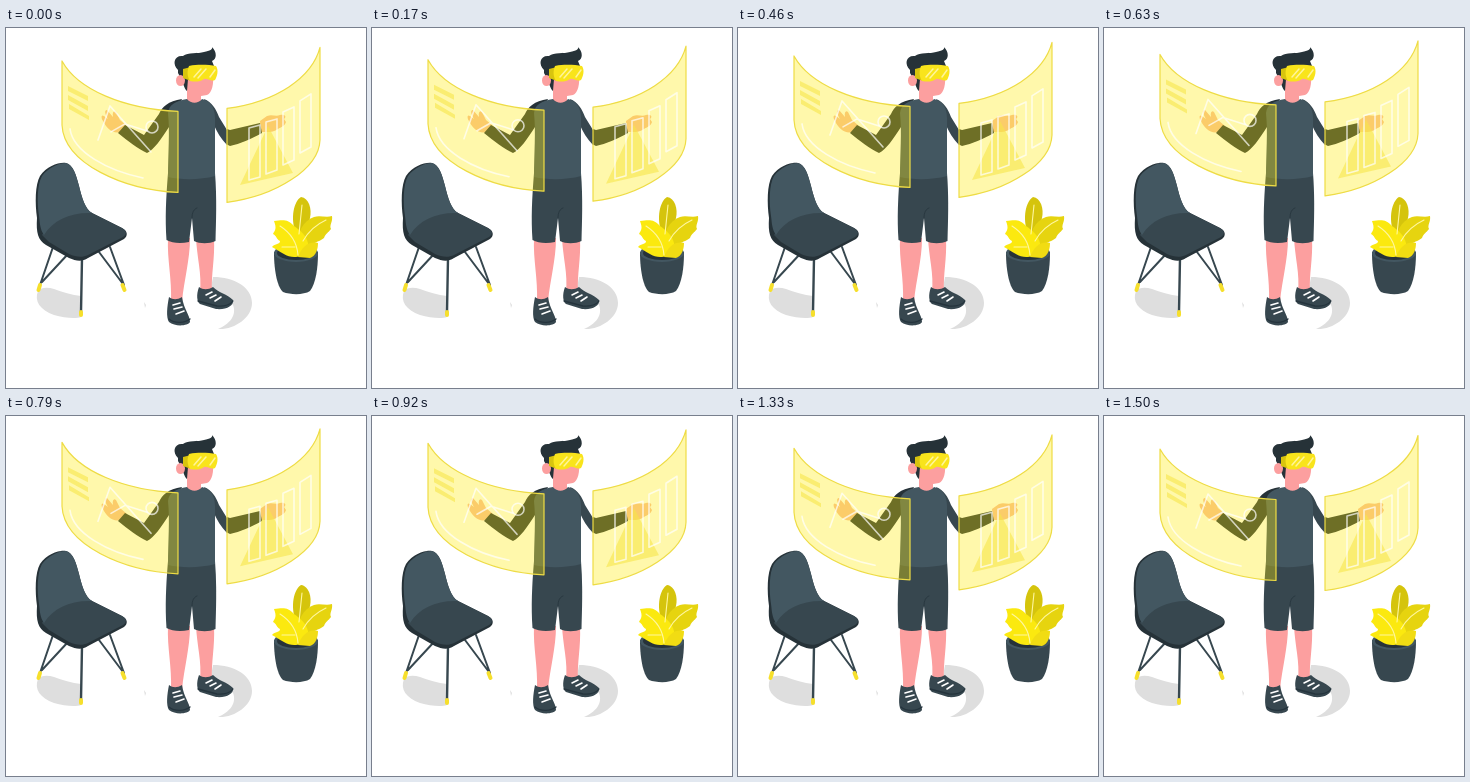
Animation, 360 px wide and 360 px high, one loop 1540 ms. Source, as an HTML page:

```html
<!DOCTYPE html>
<html lang="en">
<head>
<meta charset="utf-8">
<title>Virtual panels</title>
<style>
  html, body { margin: 0; width: 100%; height: 100%; overflow: hidden; background: #fff; }
  svg { display: block; width: 100vw; height: 100vh; }
  .skin { fill: #fc9f9f; }
  .hand { fill: #f8bd9c; }
  .cloth { fill: #37474f; }
  .light { fill: #435761; }
  .dark { fill: #263238; }
  .line { fill: none; stroke-linecap: round; stroke-linejoin: round; }
  .glass { fill: #ffe800; fill-opacity: .33; stroke: #eedc45; stroke-width: 1.2; stroke-linejoin: round; }
  .ink { stroke: #fff; stroke-width: 1.6; stroke-opacity: .7; }
</style>
</head>
<body>
<svg viewBox="0 0 360 360">
  <g fill="#dedede">
    <path d="M32 263C28 273 34 282 48 287C58 290 70 291 75 289V268C66 267 56 264 48 261C42 259 35 259 32 263Z"/>
    <path d="M207 249C228 249 246 259 246 275C246 290 228 302 212 301C224 296 231 287 227 277L205 260Z"/>
    <path d="M138 274L140 277L139 280Z"/>
  </g>

  <g id="chair">
    <g class="line" stroke="#37474f" stroke-width="2">
      <path d="M47 219L34 257M62 226L36 254M93 224L117 256M104 219L118 257"/>
      <path d="M76 230L75 284" stroke-width="2.4"/>
    </g>
    <g class="line" stroke="#f6df2c" stroke-width="4">
      <path d="M34 257L32.500 262M75 284V287M116.500 257L118.500 262"/>
    </g>
    <path class="dark" d="M31 190C29 175 29 157 34 148C41 138 53 134 60 135C67 137 70 146 73 158C76 170 79 181 86 185L116 200C122 203 122 208 118 211L82 230C76 234 70 233 63 230L40 217C32 212 30 205 31 190Z"/>
    <path class="cloth" d="M36 207C44 194 62 182 84 184L116 200C121 203 121 206 117 209L82 227C76 230 70 229 63 226L43 214Z"/>
    <path class="light" d="M33 188C31 174 31 157 36 148C43 139 53 135 60 135C67 137 70 146 73 158C76 170 79 181 86 185C65 184 47 192 38 207C34 201 34 196 33 188Z"/>
  </g>

  <g id="plant">
    <path class="cloth" d="M268 224C268 245 272 260 277 264C285 267 298 267 304 263C310 255 312 240 312 224Z"/>
    <ellipse class="light" cx="290" cy="225" rx="22" ry="9"/>
    <ellipse class="dark" cx="290" cy="225" rx="19" ry="7"/>
    <path fill="#d5c40c" d="M290 206C284 190 288 173 295 169C303 170 306 181 304 190C302 198 299 204 298 210Z"/>
    <path fill="#e6d40f" d="M291 222C290 205 297 193 308 189C314 187 320 190 326 188C327 194 323 197 325 201C322 205 320 205 318 210C312 215 307 213 303 221Z"/>
    <path fill="#fbe90f" d="M290 229C282 230 275 224 266 219C269 215 274 217 274 213C270 211 271 208 267 206C269 202 271 201 268 193C277 192 282 191 288 198C295 203 300 207 302 215C303 222 298 228 290 229Z"/>
    <path fill="#f1dc13" d="M292 229C296 219 302 213 312 215C312 221 310 228 304 230Z"/>
    <g class="line" stroke="#fff7a0" stroke-width="1.1">
      <path d="M293 206L296 177M297 213C302 204 309 197 320 192M274 198C285 205 291 215 292 227M276 219L289 219"/>
    </g>
  </g>

  <g id="man">
    <path class="skin" d="M162 210H184C184 232 178 252 176 274H165C166 250 161 232 162 210ZM190 210H208C209 232 205 246 206 264H194C196 246 191 230 190 210Z"/>
    <path class="cloth" d="M163 269C161 279 160 289 163 294C169 299 182 298 184 294C184 287 178 282 176 269C171 272 167 272 163 269ZM193 259C190 267 191 274 194 276L210 281C220 282 228 278 227 272C221 266 213 265 207 259C202 262 197 262 193 259Z"/>
    <path class="line" d="M163 291C169 296 179 295 184 291M192 273L211 278C219 279 225 276 227 273" stroke="#25343d" stroke-width="1.3"/>
    <path class="line" d="M167 277L174 275M168 281L176 279M170 286L178 283M200 267L206 264M204 270L210 267M209 273L215 269" stroke="#fff" stroke-width="1.6"/>
    <path class="cloth" d="M162 145H209C211 170 210 195 209.500 213C203 216 194 216 188 213L186 190L183 214C174 216 166 215 160.500 212C159 190 160 170 162 145Z"/>
    <path class="line" d="M186 190C186 184 188 181 191 180" stroke="#293840"/>

    <path class="hand" d="M114 104C107 106 100 100 97 93C95 90 95 86 98 88L102 91C99 86 98 82 101 82L107 89C106 84 108 82 110 84L114 92L121 98ZM254 93L261 88C266 86 270 89 274 87C279 86 281 89 278 91L280 94C279 98 275 99 272 101C267 105 261 104 255 104Z"/>
    <path class="dark" d="M176 71C162 73 156 79 153 86L138 107L119 97L112 105C122 113 132 121 141 125C148 122 155 111 163 99Z"/>
    <path class="cloth" d="M198 71C206 74 210 81 213 89L221 102V117C215 111 211 104 207 95Z"/>
    <path class="dark" d="M221 101L224 102L254 95L256 105C245 111 234 116 224 118L221 116.500Z"/>
    <path class="skin" d="M180 45H207C208 56 206 65 201 67L195 68V76H181V62C178 57 176 51 180 45Z"/>
    <path class="light" d="M181 71C185 76 192 76 196 71C204 73 209 79 209 90V148C195 152 175 152 162 149C162 125 164 105 162 85C163 76 170 73 181 71Z"/>
    <path class="dark" d="M172 42C166 36 168 27 177 28C182 24 192 26 198 24C204 23 207 21 206 19C211 24 211 31 206 33L208 38L188 41L182 51L181 63C178 61 177 53 172 45Z"/>
    <ellipse class="skin" cx="174.500" cy="52.500" rx="4.500" ry="5.500"/>
    <path fill="#d8c40e" d="M177 41L185 39V53L177 50Z"/>
    <path fill="#f9e41b" d="M183 38C193 36 203 37 210 38C213 42 211 49 209 52C205 54 201 50 198 51C194 54 189 54 184 53C181 48 181 43 183 38Z"/>
    <path class="line" d="M188 49L195 41M192 50L200 41M204 49L209 42" stroke="#fff59b" stroke-width="1.5"/>
  </g>

  <g id="panels">
    <path class="glass" d="M56 33C72 62 118 81 172 83.500V164.500C118 162 58 136 56 97Z"/>
    <path class="glass" d="M314 19.500C306 50 270 74 221 80.500V174.500C270 168 313 141 314 112Z"/>
    <path fill="#f7e64c" fill-opacity=".6" d="M62 58L82 68V73L62 63ZM62 67L82 78V83L62 72ZM63 76L83 88V92L63 81ZM262 98L234 157L287 145Z"/>
    <g class="line ink">
      <path d="M92 112L104 78L145 124M105 104L119 96L141 103"/>
      <circle cx="146" cy="99" r="6"/>
      <path d="M64 101C67 124 102 143 137 150"/>
      <path d="M243 100L254 97V149L243 152ZM260 94L271 91V142L260 146ZM277 84L288 79V132L277 137ZM294 73L305 66V119L294 125Z"/>
    </g>
  </g>
</svg>
<script>
  const LOOP = 1540, LEAD = 50, RISE = 3.4;
  const panels = document.getElementById('panels');

  function draw(now) {
    const phase = (now + LEAD) / LOOP * 2 * Math.PI;
    panels.setAttribute('transform', `translate(0 ${RISE * (Math.cos(phase) - 1)})`);
    requestAnimationFrame(draw);
  }
  draw(performance.now());
</script>
</body>
</html>
```
